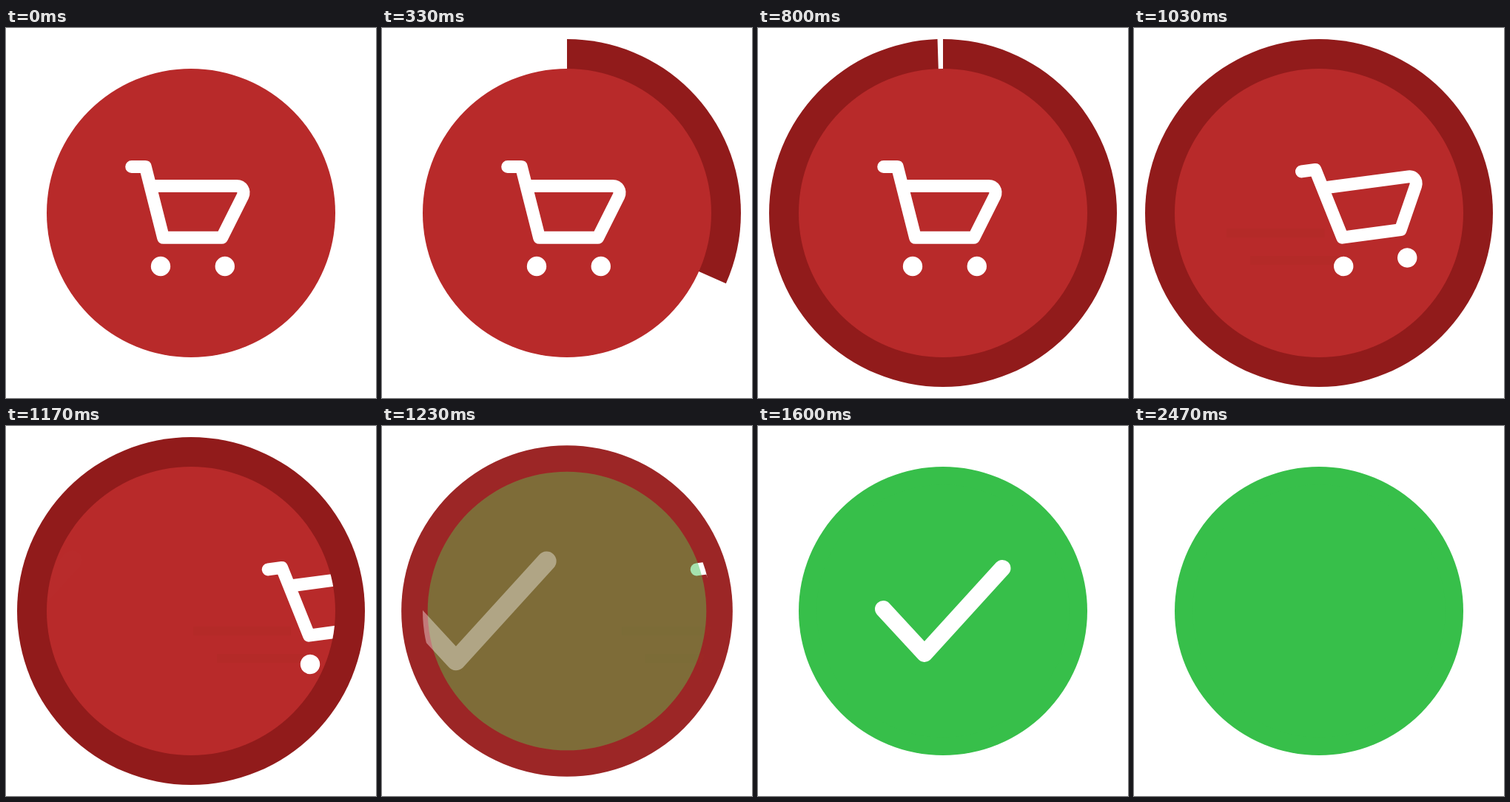
Write an HTML page with a canvas that moves like this. It is 500 by 500 pixels and loops after 2.51 s.

```html
<!DOCTYPE html>
<html lang="en">
<head>
<meta charset="utf-8">
<title>Cart to check</title>
<style>
html, body { margin: 0; width: 100%; height: 100%; overflow: hidden; background: #fff; }
canvas { display: block; width: 100vmin; height: 100vmin; }
</style>
</head>
<body>
<canvas id="stage" width="500" height="500"></canvas>
<script>
const ctx = document.getElementById('stage').getContext('2d');
const LOOP = 2510, CENTER = 250, RADIUS = 195;
const RED = '#b82a2a', DARK = [145, 27, 27], FADED = [156, 38, 38], GREEN = '#37bf4a';

const cartPath = new Path2D('M169.7 187.5H188.3L212.6 283.3H291.8L320 227C323 220 318.5 213.5 312 213.5H197');
const checkPath = new Path2D('M169.3 247.3L225 307.6L330.2 192.2');

// Eased progress from one tick to another, at 30 ticks per second.
const ease = (tick, from, to) => {
  const p = Math.min(1, Math.max(0, (tick - from) / (to - from)));
  return p * p * (3 - 2 * p);
};
const mix = (a, b, p) => a + (b - a) * p;

function disc(x, y, r, color, alpha = 1) {
  ctx.globalAlpha = alpha;
  ctx.fillStyle = color;
  ctx.beginPath();
  ctx.arc(x, y, r, 0, Math.PI * 2);
  ctx.fill();
  ctx.globalAlpha = 1;
}

function clipped(draw) {
  ctx.save();
  ctx.beginPath();
  ctx.arc(CENTER, CENTER, RADIUS, 0, Math.PI * 2);
  ctx.clip();
  draw();
  ctx.restore();
}

function line(path, width) {
  ctx.strokeStyle = '#fff';
  ctx.lineWidth = width;
  ctx.lineCap = ctx.lineJoin = 'round';
  ctx.stroke(path);
}

function drawRing(tick) {
  const sweep = ease(tick, 1, 25);
  if (!sweep) return;
  const radius = mix(235, RADIUS, ease(tick, 35.4, 40));
  const fade = ease(tick, 35, 37);
  const color = `rgb(${DARK.map((c, i) => Math.round(mix(c, FADED[i], fade)))})`;
  if (sweep < 1) {
    ctx.fillStyle = color;
    ctx.beginPath();
    ctx.moveTo(CENTER, CENTER);
    ctx.arc(CENTER, CENTER, radius, -Math.PI / 2, Math.PI * (2 * sweep - 0.5));
    ctx.fill();
    return;
  }
  const green = ease(tick, 37, 39.2);
  if (green < 1) disc(CENTER, CENTER, radius, color);
  disc(CENTER, CENTER, radius, GREEN, green);
}

function drawCart(tick) {
  ctx.translate(475 * ease(tick, 26, 46), 0);
  ctx.fillStyle = `rgba(160, 45, 36, ${0.18 * ease(tick, 26, 31)})`;
  ctx.fillRect(51, 271, 132, 12);
  ctx.fillRect(83, 308, 118, 12);

  // Tips up around the left wheel.
  ctx.translate(209, 322);
  ctx.rotate(-7.6 * Math.PI / 180 * ease(tick, 26, 31));
  ctx.translate(-209, -322);
  line(cartPath, 17);
  disc(209, 322, 13.2, '#fff');
  disc(295.8, 322, 13.2, '#fff');
}

function drawCheck(tick) {
  const scale = mix(1.19, 1, ease(tick, 34, 47));
  ctx.globalAlpha = ease(tick, 34.8, 40);
  ctx.translate(249.6 - 280 * (1 - ease(tick, 34, 39.5)), CENTER);
  ctx.scale(scale, scale);
  ctx.translate(-249.6, -CENTER);
  line(checkPath, 22.6);
}

function render(time) {
  const tick = Math.floor((time % LOOP + 4) * 0.03);
  ctx.fillStyle = '#fff';
  ctx.fillRect(0, 0, 500, 500);

  drawRing(tick);
  const inner = mix(RADIUS, 171, ease(tick, 35.4, 40));
  const green = ease(tick, 35, 39.3);
  if (green < 1) disc(CENTER, CENTER, inner, RED);
  if (tick < 42) clipped(() => drawCart(tick));
  disc(CENTER, CENTER, inner, GREEN, green);
  if (tick > 34 && tick < 74) clipped(() => drawCheck(tick));
}

const start = performance.now();
function loop() {
  render(performance.now() - start);
  requestAnimationFrame(loop);
}
loop();
</script>
</body>
</html>
```
